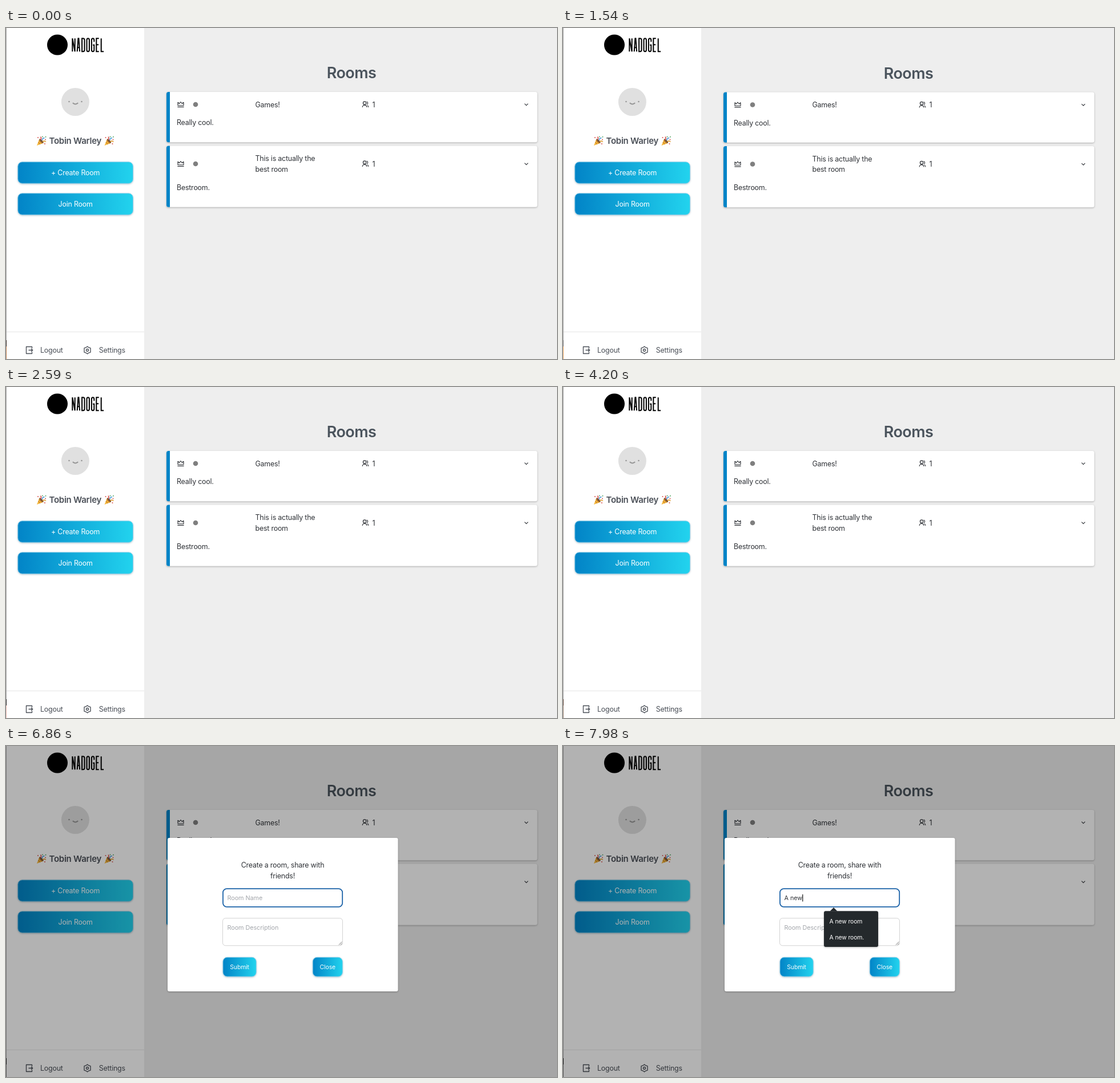
Write an HTML page that moves like this. It is 965 px wide and 580 px high and loops after 8000 ms.

```html
<!DOCTYPE html>
<html lang="en">
<head>
<meta charset="utf-8">
<title>Rooms</title>
<style>
  html, body { margin: 0; width: 100%; height: 100%; overflow: hidden; background: #eee; }
  svg { display: block; }
  text { font: 12.4px Inter, Roboto, sans-serif; letter-spacing: -.2px; fill: #2f3237; white-space: pre; }
  .mid { text-anchor: middle; }
  .title { font-size: 27px; font-weight: 600; letter-spacing: -.55px; fill: #4b545d; }
  .name { font-size: 15px; font-weight: 600; letter-spacing: -.25px; fill: #4a4f57; }
  .soft { fill: #4a4f57; }
  .white { fill: #fff; }
  .small { font-size: 10.4px; letter-spacing: -.1px; }
  .field { font-size: 10.8px; letter-spacing: -.05px; }
  .hint { fill: #a3a6ab; }
  .line { fill: none; stroke: #2f3237; stroke-width: 1.15; stroke-linejoin: round; }
  .card { filter: drop-shadow(0 1px 1.5px rgba(0, 0, 0, .28)); }
  .button { filter: drop-shadow(0 1.5px 1.5px rgba(0, 60, 90, .3)); }
</style>
</head>
<body>
<svg id="stage" width="965" height="580" viewBox="0 0 965 580">
  <defs>
    <linearGradient id="sky">
      <stop offset="0" stop-color="#0284c7"/>
      <stop offset="1" stop-color="#22d3ee"/>
    </linearGradient>
    <symbol id="popper" viewBox="0 0 18 18">
      <path d="M1 17L5.5 5.5Q10.500 7 12.500 12.500Z" fill="#f5b93d"/>
      <path d="M3.400 11L7 14.800M4.600 8L10 13.600" stroke="#c9822b" stroke-width="1.100"/>
      <ellipse cx="9" cy="9" rx="1.700" ry="4.800" transform="rotate(-45 9 9)" fill="#7a5236"/>
      <path d="M8 7Q9.500 4 7.500 1.500" stroke="#d8504e" stroke-width="1.500" fill="none"/>
      <path d="M10 8Q10.500 4 14.500 3.500" stroke="#4a9bd8" stroke-width="1.500" fill="none"/>
      <path d="M11 10Q14 8 17 10.500" stroke="#e0a030" stroke-width="1.500" fill="none"/>
      <g fill="#d8504e"><circle cx="16" cy="6.500" r="1"/><circle cx="3" cy="3" r="1"/><circle cx="15" cy="14" r="1"/></g>
      <g fill="#58a866"><circle cx="11" cy="1.600" r="1"/><circle cx="16.500" cy="1.700" r="1"/></g>
    </symbol>
    <g id="crown" class="line">
      <path d="M-5 1.700V-3.700L-2.300-1.500L0-4.500L2.300-1.500L5-3.700V1.700ZM-5.600 4.300H5.600"/>
    </g>
    <g id="people" class="line">
      <circle cx="-1.400" cy="-2.400" r="2.700"/>
      <path d="M-5.300 5A3.900 3.900 0 0 1 2.500 5M2.200-5A2.700 2.700 0 0 1 2.600 0M3.300 1.500Q5.300 2.700 5.400 5"/>
    </g>
  </defs>

  <rect width="965" height="580" fill="#eee"/>
  <g id="rooms"></g>

  <rect width="242" height="580" fill="#fff"/>
  <path d="M0 532.500H242" stroke="#e6e6e6"/>
  <rect width="1" height="580" fill="#a8a8a8"/>
  <rect id="edgeTop" y="547" width="1" height="11"/>
  <rect id="edgeLow" y="558" width="1" height="22"/>

  <circle cx="90" cy="29.500" r="18"/>
  <g id="wordmark" role="img" aria-label="NADOGEL" fill="none" stroke="#000" stroke-width="2"></g>

  <circle cx="121.400" cy="129.500" r="24.500" fill="#e0e0e0"/>
  <g fill="#969696"><circle cx="110.500" cy="129" r="1.300"/><circle cx="132.500" cy="129" r="1.300"/></g>
  <path d="M116.800 131.300Q121.500 135.500 126.200 131.300" fill="none" stroke="#969696" stroke-width="1.900"/>

  <use href="#popper" x="53" y="189" width="18" height="18"/>
  <text class="name mid" x="121.300" y="203">Tobin Warley</text>
  <use href="#popper" x="171.500" y="189" width="18" height="18"/>
  <g id="actions"></g>

  <g class="line" style="stroke:#4a4f57;stroke-width:1.350">
    <path d="M45.500 561.500V558.500H35.500V570.500H45.500V567.500M39.500 564.500H46.500M44.200 562L46.700 564.500L44.200 567"/>
    <path d="M142.500 558L144.600 559.700L148 560.800V568.200L144.600 569.300L142.500 571L140.400 569.300L137 568.200V560.800L140.400 559.700Z"/>
    <circle cx="142.500" cy="564.500" r="2"/>
  </g>
  <text class="soft" x="60" y="569">Logout</text>
  <text class="soft" x="162.700" y="569">Settings</text>

  <g id="modal">
    <rect width="965" height="580" fill="#000" opacity=".3"/>
    <rect class="card" x="283" y="161" width="403.500" height="269" rx="3" fill="#fff"/>
    <text class="mid" x="484.500" y="213.300">Create a room, share with</text>
    <text class="mid" x="484.500" y="232">friends!</text>
    <rect x="380" y="250.200" width="209.200" height="31.600" rx="6.500" fill="#fff" stroke="#1c63a8" stroke-width="1.800"/>
    <text id="hint" class="field hint" x="387.500" y="270">Room Name</text>
    <text id="typed" class="field" x="387.500" y="270"></text>
    <rect id="caret" y="260" width="1.200" height="12.500" fill="#111"/>
    <rect x="379.500" y="301.800" width="210" height="48" rx="5" fill="#fff" stroke="#d2d2d2"/>
    <text class="field hint" x="387.500" y="322">Room Description</text>
    <path d="M583 348.500L588.500 343M586 348.500L588.500 346" stroke="#666" stroke-width=".9"/>
    <g id="choices"></g>
    <g id="popup">
      <path d="M467.500 289.500L474 283L480.500 289.500Z" fill="#24292c"/>
      <rect id="popupBox" class="card" x="457" y="289.300" width="95" rx="3" fill="#24292c"/>
      <g id="popupItems"></g>
    </g>
  </g>
</svg>
<script>
const LOOP = 8000, STEP = 70, OPEN = 5250;
const $ = id => document.getElementById(id);

const button = (x, y, w, h, label, cls = '') => `
  <rect class="button" x="${x}" y="${y}" width="${w}" height="${h}" rx="7.5"
    fill="url(#sky)" stroke="#86cdea" stroke-width=".8"/>
  <text class="white mid ${cls}" x="${x + w / 2}" y="${y + h / 2 + (cls ? 3.8 : 4.5)}">${label}</text>`;

function card(y, h, mid, titleLines, note) {
  const top = mid + 4.5 - (titleLines.length - 1) * 9.4;
  const lines = titleLines.map((s, i) => `<text x="436.500" y="${top + i * 18.8}">${s}</text>`).join('');
  return `
    <g class="card">
      <rect x="281" y="${y}" width="649.5" height="${h}" rx="3.5" fill="#fff"/>
      <path d="M287 ${y}H284.500Q281 ${y} 281 ${y + 3.5}V${y + h - 3.5}Q281 ${y + h} 284.500 ${y + h}H287Z" fill="#0284c7"/>
    </g>
    <use href="#crown" x="306" y="${mid}"/>
    <circle cx="332" cy="${mid}" r="4.3" fill="#7f7f7f"/>
    ${lines}
    <use href="#people" x="629.5" y="${mid}"/>
    <text x="641.5" y="${mid + 4.5}">1</text>
    <path class="line" d="M908.300 ${mid - 1.4}l3 3l3-3"/>
    <text x="299" y="${y + h - 29.9}">${note}</text>`;
}

$('rooms').innerHTML = '<text class="title mid" x="605" y="88">Rooms</text>' +
  card(112, 88.3, 134, ['Games!'], 'Really cool.') +
  card(206.5, 107.3, 238, ['This is actually the', 'best room'], 'Bestroom.');
$('actions').innerHTML = button(20.8, 234.8, 201.6, 37.4, '+ Create Room') +
  button(20.8, 289.8, 201.6, 37.4, 'Join Room');
$('choices').innerHTML = button(380, 370.3, 58.2, 33.6, 'Submit', 'small') +
  button(537.3, 370.3, 52, 33.6, 'Close', 'small');

// Condensed capitals on a 4.4 by 23 grid
const glyphs = {
  N: 'M0 23V0L4.400 23V0',
  A: 'M0 23L1.700 0H2.700L4.400 23M.7 16H3.700',
  D: 'M0 0H2Q4.400 0 4.400 3V20Q4.400 23 2 23H0Z',
  O: 'M0 3Q0 0 2.200 0T4.400 3V20Q4.400 23 2.200 23T0 20Z',
  G: 'M4.400 6V3Q4.400 0 2.200 0T0 3V20Q0 23 2.200 23T4.400 20V11.500H2.200',
  E: 'M4.400 0H0V23H4.400M0 11H3.800',
  L: 'M0 0V23H4.400'
};
$('wordmark').innerHTML = [...'NADOGEL'].map((c, i) =>
  `<path transform="translate(${116.3 + i * 8.4} 18.2)" d="${glyphs[c]}"/>`).join('');

// Vertical bounce of the room list: time, offset
const bounce = [[840, 0], [1050, -6], [1190, -1], [1260, 3], [1400, 1.6], [1540, .5], [1750, .2], [2030, 0]];
const typing = [[0, ''], [7560, 'A'], [7770, 'A '], [7840, 'A n'], [7910, 'A ne'], [7980, 'A new']];
const blink = [[0, 1], [5810, 0], [6300, 1], [6860, 0], [7350, 1]];
// Sliver of another window at the left edge: time, upper and lower colour
const edge = [
  [0, '#33261f', '#c08050'], [910, '#777', '#e8a25c'], [2240, '#222', '#e8b4ac'],
  [3290, '#444', '#b09080'], [4200, '#5a3d30', '#9a8272'], [OPEN, '#6a4636', '#8a5442'],
  [5810, '#111', '#777']
];
const ideas = ['A new room', 'A new room.', 'A fun room', 'Another room', 'Art room', 'All games'];

const at = (table, t) => table.filter(row => row[0] <= t).pop();

function glide(table, t) {
  const next = table.findIndex(row => row[0] > t);
  if (next < 1) return 0;
  const [t0, a] = table[next - 1], [t1, b] = table[next];
  return a + (b - a) * (t - t0) / (t1 - t0);
}

function showPopup(text) {
  const items = ideas.filter(s => s.startsWith(text));
  $('popup').style.display = text ? '' : 'none';
  $('popupBox').setAttribute('height', 6 + items.length * 28.4);
  $('popupItems').innerHTML = items.map((s, i) =>
    `<text class="white small" x="466.5" y="${310.8 + i * 28.4}">${s}</text>`).join('');
}

let last = -1;
function draw() {
  const t = Math.floor(performance.now() % LOOP / STEP) * STEP;
  if (t !== last) {
    last = t;
    const text = at(typing, t)[1];
    const [, upper, lower] = at(edge, t);
    $('rooms').setAttribute('transform', `translate(0 ${glide(bounce, t)})`);
    $('edgeTop').setAttribute('fill', upper);
    $('edgeLow').setAttribute('fill', lower);
    $('modal').style.display = t >= OPEN ? '' : 'none';
    $('hint').style.display = text ? 'none' : '';
    $('typed').textContent = text;
    $('caret').setAttribute('x', 387.6 + (text ? $('typed').getComputedTextLength() : 0));
    $('caret').setAttribute('opacity', at(blink, t)[1]);
    showPopup(text);
  }
  requestAnimationFrame(draw);
}
draw();
</script>
</body>
</html>
```
